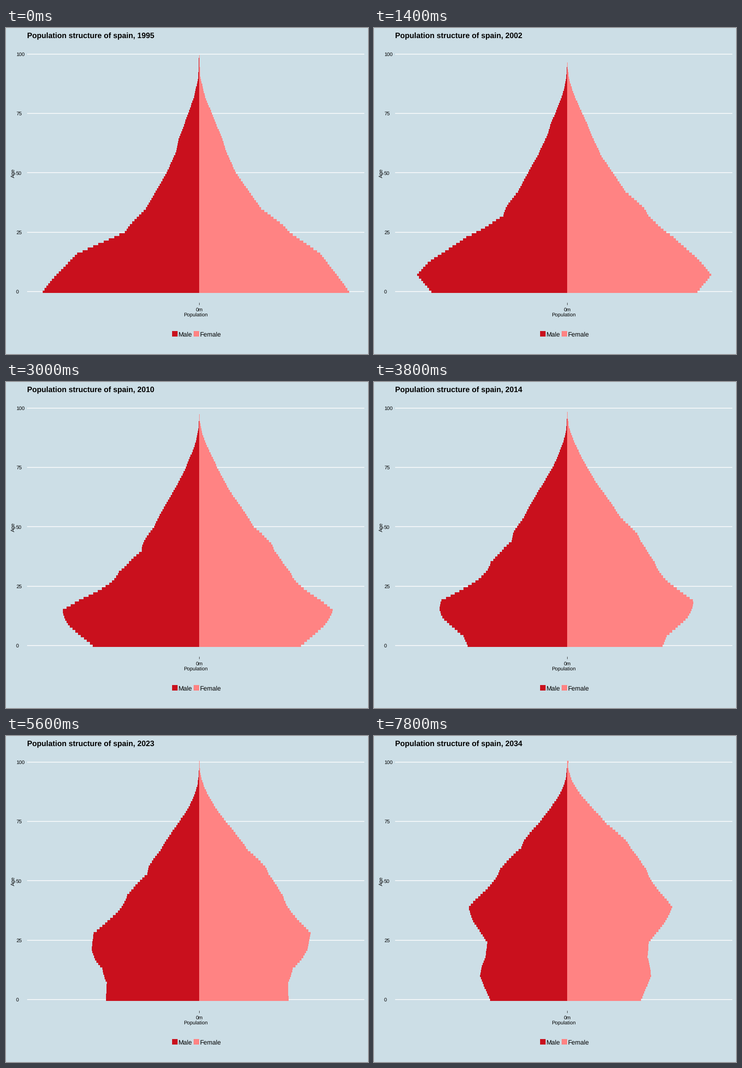
A matplotlib script that plays this animation: 789x710 px, repeating every 8000 ms.

```python
import matplotlib.pyplot as plt
import numpy as np
from matplotlib.animation import FuncAnimation
from matplotlib.patches import Rectangle

W, H, DPI = 789, 710, 64
PX = 72 / DPI                     # points per pixel
MID = 421                         # x of zero population
FIRST, YEARS = 1995, 40
BG, RED, PINK = "#ccdee6", "#c9101d", "#ff8383"

plt.rcParams["font.family"] = "Liberation Sans"
plt.rcParams["text.hinting"] = "none"

AGES = np.arange(101)
# Outline of the first year at its bends, as half-widths in pixels.
BENDS = [0, 5, 16, 25, 28, 35, 50, 59, 64, 82, 90, 100]
MALE = [341, 321, 266, 162, 151, 116, 71, 50, 44.5, 11, 2, 0.2]
FEMALE = [327, 308, 264, 197, 183, 135, 80, 59, 51, 13, 2.7, 0.3]


def age_y(age):
    return 574.1 - 5.173 * age


def bell(x, mid, spread):
    return np.exp(-((x - mid) / spread) ** 2)


def births(year):
    return np.interp(year, [1995, 2002, 2010, 2016, 2024, 2034],
                     [341, 296, 231.5, 210, 202, 168])


def loss(year, leaving, dying):
    """Yearly rate at which each age shrinks."""
    k = AGES + 0.5
    base = 0.006 * np.exp(-k / 60)
    youth = (0.0155 + 0.0105 * bell(year, 2005, 6)) * bell(k, 20.5, 8)
    adult = (0.018 * bell(year, 2003, 13) * np.exp((22 - k) / 18)
             / (1 + np.exp((22 - k) / 2)))
    death = 0.138 * np.exp((k - 85) / 10) * (1.3 - 0.014 * (year - 1998))
    return base + leaving * (youth + adult) + dying * death


def simulate(start, newborn, leaving, dying):
    """Age every cohort by one year at a time; the top bar collects 100+."""
    rows = [np.interp(AGES, BENDS, start)]
    for year in range(FIRST, FIRST + YEARS - 1):
        left = rows[-1] * np.exp(-loss(year + 0.5, leaving, dying))
        row = np.append(newborn * births(year + 1), left[:-1])
        row[-1] += left[-1]
        rows.append(row)
    return rows


SIDES = [(-1, RED, simulate(MALE, 1, 1, 1)),
         (1, PINK, simulate(FEMALE, 0.96, 0.63, 0.7))]

fig = plt.figure(figsize=(W / DPI, H / DPI), dpi=DPI, facecolor=BG)
ax = fig.add_axes([0, 0, 1, 1])
ax.axis("off")


def label(x, y, text, size, **kw):
    return ax.text(x, y, text, fontsize=size * PX, color="black", **kw)


for age in range(0, 101, 25):
    y = age_y(age)
    ax.plot([46.5, 781], [y, y], color="white", lw=1.5 * PX, zorder=1,
            solid_capstyle="butt")
    label(22, y + 4, str(age), 11.1)

edges = age_y(np.arange(-0.5, 101))
bars = [ax.stairs(MID + sign * rows[0], edges, baseline=MID,
                  orientation="horizontal", fill=True, color=color, lw=0,
                  zorder=2, antialiased=False)
        for sign, color, rows in SIDES]

title = label(46, 21.7, "", 16.6, weight="bold")
label(15.5, 316, "Age", 11.1, rotation=90, ha="center", va="center")
ax.plot([421.3, 421.3], [597.5, 602.5], color="#333333", lw=PX,
        solid_capstyle="butt")
label(421, 617, "0m", 11.1, ha="center")
label(413.7, 629, "Population", 11.1, ha="center")
for x, name, color in [(362, "Male", RED), (409, "Female", PINK)]:
    ax.add_patch(Rectangle((x, 660), 12, 12, fc=color, lw=0))
    label(x + 14.2, 671.5, name, 13.9)

ax.set_xlim(0, W)
ax.set_ylim(H, 0)


def draw(i):
    title.set_text(f"Population structure of spain, {FIRST + i}")
    for bar, (sign, _, rows) in zip(bars, SIDES):
        bar.set_data(MID + sign * rows[i], edges, MID)
    return [title, *bars]


anim = FuncAnimation(fig, draw, frames=YEARS, interval=200,
                     repeat=True, repeat_delay=0)
plt.show()
```
